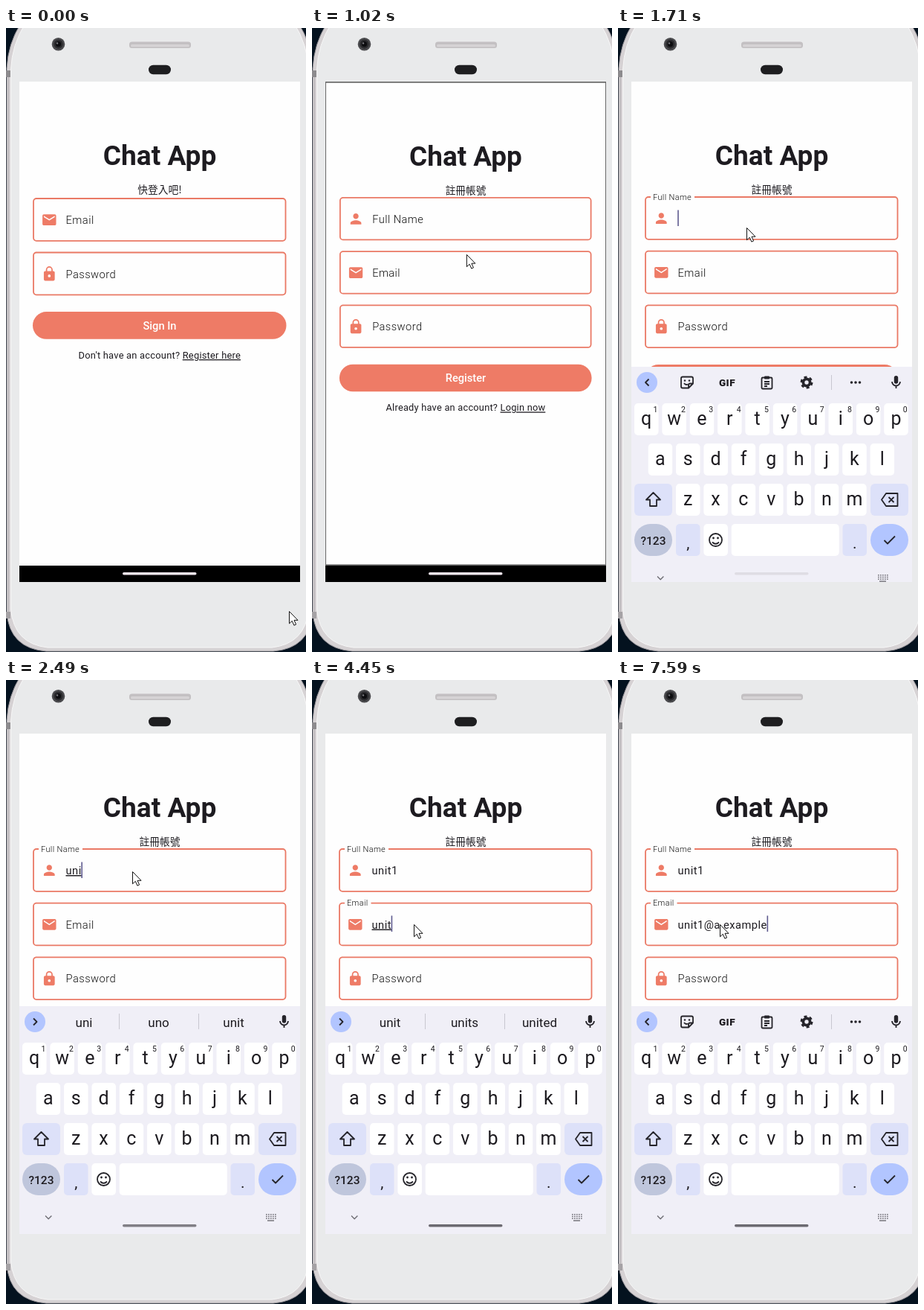
An HTML page for the animation above (7.99 s loop, 404x838 px).

```html
<!DOCTYPE html>
<html lang="en">
<head>
<meta charset="utf-8">
<title>Chat App sign-up</title>
<style>
  html, body { margin: 0; width: 100%; height: 100%; overflow: hidden; background: #04121f; }
  svg { display: block; width: 100%; height: 100%; }
  text { font-family: Roboto, sans-serif; fill: #1d1b20; white-space: pre; }
  .mid { text-anchor: middle; }
  .title { font-size: 37.1px; font-weight: 700; }
  .sub { font: 13.75px "Noto Sans CJK TC", "Noto Sans CJK SC", "Noto Sans CJK JP", "Noto Sans CJK", sans-serif; }
  .label { font-size: 14.7px; font-weight: 300; letter-spacing: .46px; fill: #111; }
  .value { font-size: 14.7px; letter-spacing: .46px; }
  .button { font-size: 14.7px; font-weight: 500; fill: #fff; }
  .note { font-size: 12.88px; letter-spacing: .23px; }
  .key { font-size: 25px; }
  .digit { font-size: 10.5px; }
  .word { font-size: 17px; }
  .coral { fill: #ee7b66; }
  .outline { fill: none; stroke: #ea7965; stroke-width: 1.8; }
  .line { fill: none; stroke: #25242a; stroke-width: 1.8; stroke-linejoin: round; }
</style>
</head>
<body>
<svg id="stage" viewBox="0 0 404 838" preserveAspectRatio="none"></svg>
<script>
const LOOP = 7990;
const INK = '#25242a', BLUE = '#b2c5ff', PALE = '#dde1f9';

const ICONS = {
  mail: 'M20 4H4c-1.1 0-2 .9-2 2v12c0 1.1.9 2 2 2h16c1.1 0 2-.9 2-2V6c0-1.1-.9-2-2-2zm0 4l-8 5-8-5V6l8 5 8-5v2z',
  person: 'M12 12c2.2 0 4-1.8 4-4s-1.8-4-4-4-4 1.8-4 4 1.8 4 4 4zm0 2c-2.7 0-8 1.3-8 4v2h16v-2c0-2.7-5.3-4-8-4z',
  lock: 'M18 8h-1V6A5 5 0 0 0 7 6v2H6c-1.1 0-2 .9-2 2v10c0 1.1.9 2 2 2h12c1.1 0 2-.9 2-2V10c0-1.1-.9-2-2-2zm-6 9a2 2 0 1 1 0-4 2 2 0 0 1 0 4zm3.1-9H8.9V6a3.1 3.1 0 0 1 6.2 0v2z',
  mic: 'M12 14a3 3 0 0 0 3-3V5a3 3 0 0 0-6 0v6a3 3 0 0 0 3 3zm5-3a5 5 0 0 1-10 0H5c0 3.5 2.6 6.4 6 6.9V21h2v-3.1c3.4-.5 6-3.4 6-6.9z'
};

// Markup helpers
const text = (x, y, cls, str, attrs = '') => `<text x="${x}" y="${y}" class="${cls}" ${attrs}>${str}</text>`;
const box = (x, y, w, h, r, fill, attrs = '') =>
  `<rect x="${x}" y="${y}" width="${w}" height="${h}" rx="${r}" fill="${fill}" ${attrs}/>`;
const line = (d, attrs = '') => `<path class="line" d="${d}" ${attrs}/>`;
const dot = (x, y, r, fill = INK) => `<circle cx="${x}" cy="${y}" r="${r}" fill="${fill}"/>`;
const icon = (name, x, y, attrs, scale = .92) =>
  `<path d="${ICONS[name]}" ${attrs} transform="translate(${x} ${y}) scale(${scale}) translate(-12 -12)"/>`;

const outline = (y, gap) =>
  `M${gap ? 44 + gap : 40} ${y}H372.5a4 4 0 0 1 4 4v48.8a4 4 0 0 1-4 4H41a4 4 0 0 1-4-4V${y + 4}a4 4 0 0 1 4-4H44`;
const labelPose = (y, t) =>
  `translate(${80.5 - 33.5 * t} ${y + 34 - 30.5 * t}) scale(${1 - .25 * t})`;

const field = (y, iconName, label, id) => `
  <path id="${id}Box" class="outline" d="${outline(y, 0)}"/>
  ${icon(iconName, 58.3, y + 28.7, 'class="coral"')}
  <text id="${id}Label" class="label" transform="${labelPose(y, 0)}">${label}</text>
  ${text(80.5, y + 34, 'value', '', `id="${id}Value"`)}`;

const page = (subtitle, fields, buttonY, button, question, link, noteX) => `
  ${box(18, 72, 378, 650, 0, '#fefefe')}
  ${text(207, 184, 'title mid', 'Chat App')}
  ${text(207, 222, 'sub mid', subtitle)}
  ${fields}
  ${box(36, buttonY, 341.5, 36.8, 18.4, '#ee7b66')}
  ${text(207, buttonY + 23.8, 'button mid', button)}
  ${text(noteX, buttonY + 63, 'note', `${question} <tspan text-decoration="underline">${link}</tspan>`)}`;

const loginPage = page('快登入吧!',
  field(229, 'mail', 'Email', 'a') + field(301.5, 'lock', 'Password', 'b'),
  381, 'Sign In', "Don't have an account?", 'Register here', 97.5);
const registerPage = page('註冊帳號',
  field(227, 'person', 'Full Name', 'name') + field(299.6, 'mail', 'Email', 'mail') + field(372.3, 'lock', 'Password', 'pass'),
  452, 'Register', 'Already have an account?', 'Login now', 99);

function keyboard() {
  const pitch = 37.36;
  const row = (letters, x0, y) => [...letters].map((ch, i) => {
    const x = x0 + i * pitch;
    return box(x, y, 32.5, 43, 5, '#fff') + text(x + 16.2, y + 29, 'key mid', ch);
  }).join('');
  const digits = [...'1234567890'].map((d, i) => text(50.5 + i * pitch, 498.5, 'digit mid', d)).join('');
  const tools = `
    ${line('M41.5 454.5l-4.5 4.5 4.5 4.5')}
    ${line('M87 451.5h12a2 2 0 0 1 2 2v7l-6 6h-8a2 2 0 0 1-2-2v-11a2 2 0 0 1 2-2zM101 460.5h-4a2 2 0 0 0-2 2v4M89 460q2 3 5 1.5')}
    ${dot(90, 456.5, 1.2)}${dot(96, 456.5, 1.2)}
    ${text(147, 463.7, 'mid', 'GIF', 'style="font-size:13.5px;font-weight:800;letter-spacing:.5px"')}
    ${line('M195 452.5h11a1.5 1.5 0 0 1 1.5 1.5v12a1.5 1.5 0 0 1-1.5 1.5h-11a1.5 1.5 0 0 1-1.5-1.5v-12a1.5 1.5 0 0 1 1.5-1.5zM197 458h7M197 461h7M197 464h4')}
    ${box(197, 450.5, 7, 4, 1, INK)}
    <circle cx="254" cy="459" r="4.6" fill="none" stroke="${INK}" stroke-width="3.8"/>
    <circle cx="254" cy="459" r="7.2" fill="none" stroke="${INK}" stroke-width="2.6" stroke-dasharray="4 3.54"/>
    ${box(287, 449, 1, 20, 0, '#c8c7d0')}
    ${[314.5, 320, 325.5].map(x => dot(x, 459, 1.8)).join('')}`;
  const words = `
    ${line('M37 454.5l4.5 4.5-4.5 4.5')}
    ${box(152, 448, 1, 21, 0, '#c8c7d0')}${box(259, 448, 1, 21, 0, '#c8c7d0')}
    ${[105, 205.5, 306.5].map((x, i) => text(x, 465.5, 'word mid', '', `id="word${i}"`)).join('')}`;
  const specks = [0, 1, 2].flatMap(r => [0, 1, 2, 3, 4].map(c =>
    box(350 + c * 3, 717 + r * 2.7, 1.7, 1.5, 0, '#77767d'))).join('');
  return `
    ${box(18, 438, 378, 330, 0, '#f0eff7')}
    ${dot(39, 459, 14, BLUE)}
    <g id="tools">${tools}</g><g id="words">${words}</g>
    ${icon('mic', 374.5, 459, `fill="${INK}"`, .9)}
    ${row('qwertyuiop', 22, 487)}${digits}
    ${row('asdfghjkl', 40.7, 541)}
    ${row('zxcvbnm', 78, 595)}
    ${box(22, 595, 51, 43, 6, PALE)}${box(340, 595, 51, 43, 6, PALE)}
    ${line('M47.5 607l-9.5 9.5h5v8.5h9v-8.5h5z')}
    ${line('M361 608h15.500v17h-15.500l-6-8.500zM364.500 613l7 7M371.500 613l-7 7')}
    ${box(22, 649, 51, 43, 21.5, '#bfc6dc')}${text(47.5, 677, 'mid', '?123', 'style="font-size:15.5px;font-weight:500"')}
    ${box(78, 649, 32.5, 43, 5, PALE)}${text(94.2, 682, 'mid', ',', 'style="font-size:21px"')}
    ${box(115.4, 649, 32.5, 43, 5, '#fff')}
    ${line('M140 670.5a8.5 8.5 0 1 1-17 0a8.5 8.5 0 1 1 17 0M127 673.5q4.5 4.5 9 0')}
    ${dot(128.5, 668, 1.4)}${dot(134.5, 668, 1.4)}
    ${box(152.7, 649, 145, 43, 5, '#fff')}
    ${box(302.5, 649, 32.5, 43, 5, PALE)}${text(318.7, 682, 'mid', '.', 'style="font-size:21px"')}
    ${box(340, 649, 51, 43, 21.5, BLUE)}${line('M358.5 671l4.5 4.5 10-10')}
    ${line('M53 719.5l4.2 4.2 4.2-4.2', 'style="stroke:#6c6b72;stroke-width:1.3"')}
    ${specks}${box(352, 725.3, 9, 1.5, 0, '#77767d')}`;
}

const phone = `
  <path d="M20-6Q3 20 1 54V785Q5 833 54 837H360Q409 833 413 785V54Q411 20 394-6z" fill="#d6d2d4" stroke="#98959a"/>
  <path d="M3.5 60V785" stroke="#b4b0b3" fill="none"/>
  ${box(0, 57, 6, 9, 0, '#8d8b8e')}${box(0, 784, 6, 9, 0, '#a5a2a5')}
  <path d="M26-6Q8 22 6.500 56V781Q11 827 56 832H358Q403 827 407.500 781V56Q406 22 388-6z" fill="#e9eaeb" stroke="#f7f7f7"/>
  ${dot(70.5, 21.7, 8.8, '#4a4a4d')}${dot(70.5, 21.7, 6.2, '#2b2b2e')}${dot(70.5, 21.7, 3.6, '#0d0d10')}${dot(69, 20.5, 1.2, '#77777c')}
  ${box(166, 18.5, 83, 8.5, 3.5, '#c3c0c2')}${box(168, 22, 79, 3.5, 1.7, '#d6d3d5')}
  ${box(192, 49.7, 30, 12.5, 6.2, '#1e1e20')}`;

const stage = document.getElementById('stage');
stage.innerHTML = `
  <defs>
    <clipPath id="screen"><rect x="18" y="72" width="378" height="672"/></clipPath>
    <clipPath id="app"><rect x="18" y="72" width="378" height="650"/></clipPath>
  </defs>
  ${phone}
  <g clip-path="url(#screen)">
    ${box(18, 72, 378, 672, 0, '#000')}
    <g clip-path="url(#app)">
      <g id="login">${loginPage}</g>
      ${box(18, 72, 378, 650, 0, '#000', 'id="scrim"')}
      <g id="register">${registerPage}${box(0, 0, 1.6, 21.5, 0, '#5f5b8f', 'id="caret"')}</g>
    </g>
    <g id="keyboard">${keyboard()}</g>
    ${box(157, 731, 99.5, 3.4, 1.7, '#f3e6f0', 'id="handle"')}
  </g>
  <path id="pointer" d="M.5.5V16.8l3.8-3.5 2.6 5.9 2.7-1.2-2.6-5.7h5z" fill="#fff" stroke="#111" stroke-width="1"/>`;

const el = {};
stage.querySelectorAll('[id]').forEach(node => el[node.id] = node);

// Timeline: [time, x, y] for the pointer, [time, text, suggestions] for typing
const pointerPath = [
  [0, 381, 783], [820, 271, 431], [880, 271, 431], [1020, 208, 304],
  [1400, 173, 268], [1710, 173, 268], [1900, 170, 257], [2840, 170, 257], [3280, 137, 328]
];
const nameTyping = [
  [1990, 'u', 'u you up'], [2210, 'un', 'un in under'], [2490, 'uni', 'uni uno unit'],
  [2630, 'unit', 'unit units united'], [2840, 'unit1']
];
const mailTyping = [
  [3790, 'u', 'u you up'], [4060, 'un', 'un in under'], [4250, 'uni', 'uni uno unit'],
  [4450, 'unit', 'unit units united'], [4990, 'unit1'], [5060, 'unit1@'], [5730, 'unit1@a'],
  [6060, 'unit1@a.'], [6190, 'unit1@a.e'], [6320, 'unit1@a.ex'], [6520, 'unit1@a.exa'],
  [6920, 'unit1@a.exam'], [7180, 'unit1@a.exampl'], [7590, 'unit1@a.example']
];

const progress = (t, start, length) => Math.min(1, Math.max(0, (t - start) / length));
const easeOut = (p, power = 3) => 1 - (1 - p) ** power;
const zoom = k => `translate(207 397) scale(${k}) translate(-207 -397)`;
const show = (node, on) => node.style.display = on ? '' : 'none';
const latest = (steps, t) => steps.filter(s => s[0] <= t).pop() || [0, ''];

function movePointer(t) {
  const i = pointerPath.findLastIndex(p => p[0] <= t);
  const a = pointerPath[i], b = pointerPath[i + 1] || a;
  const p = b === a ? 0 : progress(t, a[0], b[0] - a[0]);
  const s = i === 0 ? p * p * (3 - 2 * p) : easeOut(p, 1.5);
  el.pointer.setAttribute('transform', `translate(${a[1] + (b[1] - a[1]) * s} ${a[2] + (b[2] - a[2]) * s})`);
}

function drawField(id, y, labelWidth, float, [, value, hints]) {
  el[id + 'Box'].setAttribute('d', outline(y, labelWidth * float));
  el[id + 'Label'].setAttribute('transform', labelPose(y, float));
  el[id + 'Value'].textContent = value;
  el[id + 'Value'].setAttribute('text-decoration', hints ? 'underline' : 'none');
}

function draw(t) {
  movePointer(t);

  // Page change: new page zooms in over the darkened old one
  const p = progress(t, 850, 300), z = easeOut(p, 4);
  show(el.login, p < 1);
  show(el.register, p > 0);
  el.login.setAttribute('transform', zoom(1 + .05 * z));
  el.scrim.setAttribute('opacity', .6 * progress(p, .2, .21));
  el.register.setAttribute('transform', zoom(.85 + .15 * z));
  el.register.setAttribute('opacity', progress(p, .125, .125));

  // Form fields and caret
  const onMail = t >= 3320;
  const name = latest(nameTyping, t), mail = latest(mailTyping, t);
  drawField('name', 227, 59, easeOut(progress(t, 1440, 190)), name);
  drawField('mail', 299.6, 35.5, easeOut(progress(t, 3320, 190)), mail);
  const active = onMail ? mail : name;
  const width = active[1] ? el[onMail ? 'mailValue' : 'nameValue'].getComputedTextLength() : 0;
  el.caret.setAttribute('x', 80.2 + width);
  el.caret.setAttribute('y', onMail ? 316.5 : 244.5);
  show(el.caret, t >= 1450 && !(t >= 5460 && t < 5730));

  // Keyboard
  const slide = easeOut(progress(t, 1500, 341));
  show(el.keyboard, slide > 0);
  el.keyboard.setAttribute('transform', `translate(0 ${307 * (1 - slide)})`);
  const grey = Math.round(223 - 115 * easeOut(progress(t, 1720, 1800)));
  el.handle.setAttribute('fill', slide > .05 ? `rgb(${grey},${grey - 2},${grey + 5})` : '#f3e6f0');
  const hints = active[2];
  show(el.tools, !hints);
  show(el.words, hints);
  if (hints) hints.split(' ').forEach((word, i) => el['word' + i].textContent = word);
}

const start = performance.now();
function tick() {
  draw((performance.now() - start) % LOOP);
  requestAnimationFrame(tick);
}
tick();
</script>
</body>
</html>
```
